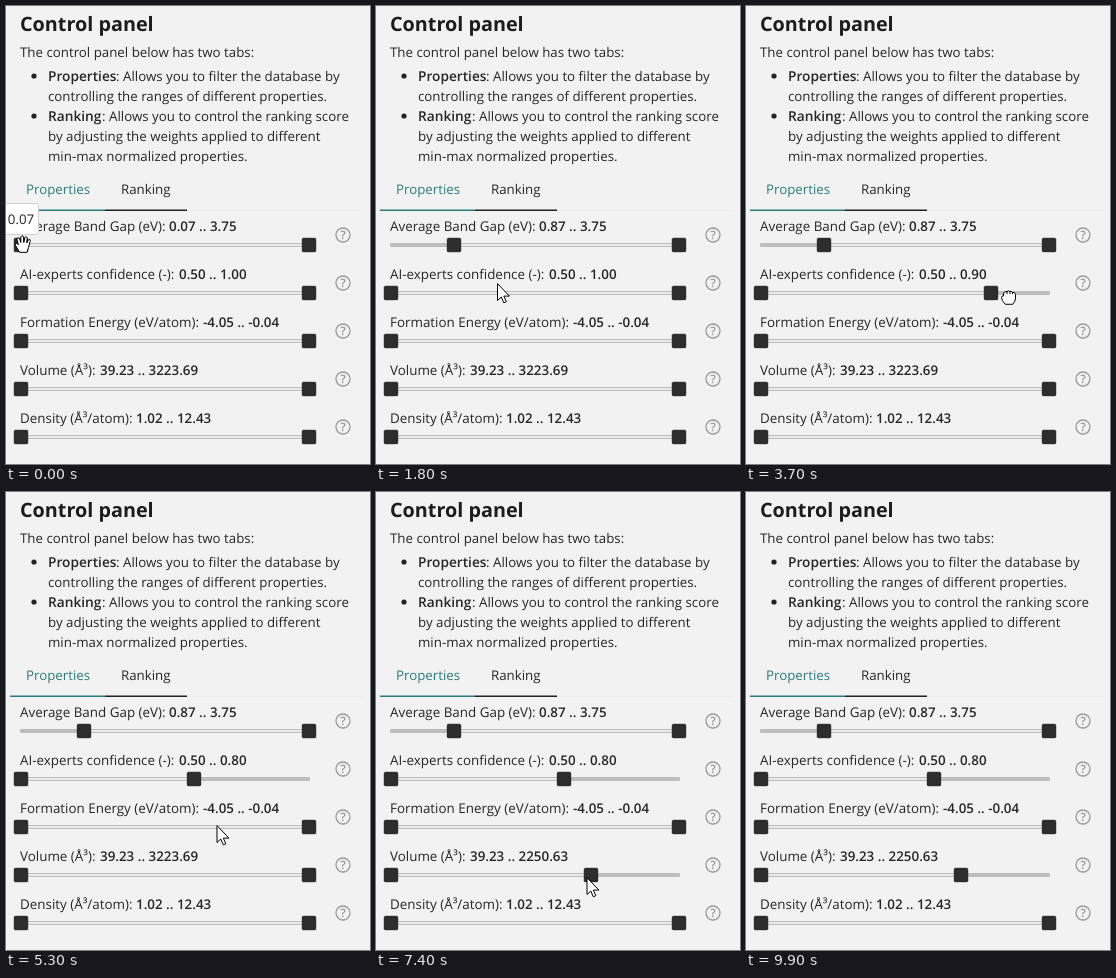
Recreate the animation shown at these times as an HTML page. Size 364x458 px, loop 10 s.

```html
<!DOCTYPE html>
<html lang="en">
<head>
<meta charset="utf-8">
<title>Control panel</title>
<style>
  html, body { margin: 0; width: 100%; height: 100%; overflow: hidden; background: #f2f2f2; }
  svg { display: block; width: 364px; height: 458px; }
  text { font: 13.3px "Open Sans", "Noto Sans", sans-serif; fill: #262626; white-space: pre; text-rendering: geometricPrecision; }
  .title { font-size: 19.8px; font-weight: 700; fill: #1c1c1c; }
  .bold { font-size: 13.4px; font-weight: 600; }
  .term { font-size: 13.7px; font-weight: 600; }
  .label { font-size: 13.4px; }
  .tab-on { fill: #2b7c7c; }
  .track { fill: #bebebe; }
  .range { fill: #e9e9e9; stroke: #bcbcbc; }
  .handle { fill: #2d2d2d; stroke: #2d2d2d; stroke-opacity: .4; }
  .help { fill: none; stroke: #9a9a9a; stroke-width: 1.3; }
  .mark { font-size: 11.5px; font-weight: 600; fill: #959595; text-anchor: middle; }
  .tip rect { fill: #fff; stroke: #cfcfcf; }
  .tip text { text-anchor: middle; }
  .cursor { fill: #fff; stroke: #000; stroke-linejoin: round; stroke-linecap: round; }
</style>
</head>
<body>
<svg id="stage" viewBox="0 0 364 458">
  <rect width="364" height="458" fill="#f2f2f2"/>
  <text class="title" x="14" y="25">Control panel</text>
  <text x="14" y="51">The control panel below has two tabs:</text>
  <circle cx="28" cy="70" r="2.6" fill="#222"/>
  <text class="term" x="42" y="75">Properties</text>
  <text x="110" y="75">: Allows you to filter the database by</text>
  <text x="42" y="95">controlling the ranges of different properties.</text>
  <circle cx="28" cy="110" r="2.6" fill="#222"/>
  <text class="term" x="42" y="115">Ranking</text>
  <text x="96" y="115">: Allows you to control the ranking score</text>
  <text x="42" y="135">by adjusting the weights applied to different</text>
  <text x="42" y="155">min-max normalized properties.</text>
  <text class="tab-on" x="20" y="188">Properties</text>
  <text x="115" y="188">Ranking</text>
  <rect x="5" y="204" width="352" height="1" fill="#ebebeb"/>
  <rect x="4" y="203.5" width="95" height="1.5" fill="#2b7c7c"/>
  <rect x="99" y="203.5" width="82" height="1.5" fill="#222"/>
</svg>
<script>
const NS = "http://www.w3.org/2000/svg";
const stage = document.getElementById("stage");
const LOOP = 10000, STEP = 100;
const LEFT = 15, SPAN = 288;

function add(parent, tag, attrs = {}, markup = "") {
  const el = document.createElementNS(NS, tag);
  set(el, attrs);
  el.innerHTML = markup;
  return parent.appendChild(el);
}

function set(el, attrs) {
  for (const key in attrs) el.setAttribute(key, attrs[key]);
}

const raise = s => s.replace("³", '<tspan dy="-2">³</tspan><tspan dy="2">') + (s.includes("³") ? "</tspan>" : "");

function makeSlider([label, valueX, min, max], i) {
  const y = 239 + 48 * i;
  add(stage, "text", { class: "label", x: 14, y: y - 14 }, raise(label));
  const value = add(stage, "text", { class: "bold", x: valueX, y: y - 14 });
  add(stage, "rect", { class: "track", x: 14, y: y - 2, width: 290, height: 4, rx: 1 });
  const range = add(stage, "rect", { class: "range", y: y - 1.5, height: 3 });
  const handles = [0, 1].map(() =>
    add(stage, "rect", { class: "handle", y: y - 7, width: 14, height: 14, rx: 1.5 }));
  add(stage, "circle", { class: "help", cx: 337, cy: y - 10, r: 7 });
  add(stage, "text", { class: "mark", x: 337, y: y - 5.8 }, "?");

  const place = v => LEFT + SPAN * (v - min) / (max - min);
  const update = (lo = min, hi = max) => {
    const a = place(lo), b = place(hi);
    value.textContent = lo.toFixed(2) + " .. " + hi.toFixed(2);
    set(range, { x: a, width: b - a });
    set(handles[0], { x: Math.round(a) - 7 });
    set(handles[1], { x: Math.round(b) - 7 });
  };
  update();
  return { y, place, update };
}

const [gap, trust, , volume] = [
  ["Average Band Gap (eV):", 163, 0.07, 3.75],
  ["AI-experts confidence (-):", 173, 0.5, 1],
  ["Formation Energy (eV/atom):", 197, -4.05, -0.04],
  ["Volume (Å³):", 94, 39.23, 3223.69],
  ["Density (Å³/atom):", 130, 1.02, 12.43]
].map(makeSlider);

const tip = add(stage, "g", { class: "tip" });
const tipBox = add(tip, "rect", { height: 31, rx: 2.5 });
const tipText = add(tip, "text");

const shapes = {
  arrow: "M0 0V16.5L3.8 13L6.3 18.8L8.8 17.7L6.3 12.1H11.5Z",
  open: "M-3.5 8L-7.5 1.5Q-8.5-.5-7-1Q-5.8-1-4.6.8L-6-4.5Q-6-6.2-4.8-6.2Q-3.7-6.2-3.2-4.5" +
    "L-2.2-1.5V-7Q-1.8-8.2-.8-8.2Q.3-8.2.5-7L.8-1.5L1.8-6.3Q2.2-7.4 3.2-7.2Q4.2-6.9 4.1-5.6" +
    "L3.8-1L5.2-4Q6-5 6.8-4.6Q7.6-4 7.2-2.8L5.5 3.5L4 8Z",
  fist: "M-3.5 7Q-7 3.5-7 .5Q-7-1.5-5-1V-3Q-5-5-3.5-5Q-2.3-5.8-1.5-5.4Q0-7 1.5-5.4Q3-6.2 4-4.6" +
    "Q7-5 7-2.5V1Q7 4.5 4.5 7ZM-1.5-5V-3.2M1.5-5V-3.2M4-4.5V-3.2"
};
const cursor = add(stage, "path", { class: "cursor" });

// time, x, y, shape until the next point
const path = [
  [0, 17, 238, "open"], [200, 17, 238, "fist"], [1100, 79, 239, "open"], [1300, 80, 241, "arrow"],
  [1800, 121.5, 278, "arrow"], [2700, 299, 285, "open"], [3100, 304, 288, "fist"],
  [3700, 262.5, 291, "fist"], [4400, 190, 290, "open"], [4700, 191, 291, "arrow"],
  [5300, 211, 334, "arrow"], [5800, 299, 383, "open"], [6000, 300, 384, "fist"],
  [6400, 247, 384, "fist"], [7100, 211, 384, "open"], [7400, 211, 386, "arrow"],
  [7800, 226, 460, "arrow"], [LOOP, 226, 460, "arrow"]
];
const gapKeys = [[200, 0.07], [1100, 0.87]];
const volumeKeys = [[6000, 3223.69], [6400, 2726.13], [7100, 2250.63]];

function sample(keys, t, col = 1) {
  if (t <= keys[0][0]) return keys[0][col];
  for (let i = 1; i < keys.length; i++) {
    const a = keys[i - 1], b = keys[i];
    if (t < b[0]) return a[col] + (b[col] - a[col]) * (t - a[0]) / (b[0] - a[0]);
  }
  return keys[keys.length - 1][col];
}

function showTip(slider, value) {
  const x = Math.round(slider.place(value)), label = value.toFixed(2);
  const width = label.length > 4 ? 60 : 36;
  set(tipBox, { x: x - width / 2 + 0.5, y: slider.y - 41.5, width: width - 1 });
  set(tipText, { x, y: slider.y - 21 });
  tipText.textContent = label;
}

function draw(t) {
  const x = sample(path, t, 1), y = sample(path, t, 2);
  const shape = path.filter(p => p[0] <= t).pop()[3];

  const gapLow = 0.07 + Math.round((sample(gapKeys, t) - 0.07) * 10) / 10;
  const dragX = Math.min(303, Math.max(188, x));
  const snapped = Math.round((0.5 + 0.5 * (dragX - LEFT) / SPAN) * 10) / 10;
  const trustHigh = t < 3100 ? 1 : t < 4400 ? snapped : 0.8;
  const volumeHigh = sample(volumeKeys, t);
  gap.update(gapLow);
  trust.update(undefined, trustHigh);
  volume.update(undefined, volumeHigh);

  const onTrust = Math.abs(x - trust.place(trustHigh)) < 9;
  const hover = shape !== "arrow" && (t < 2000 || t > 5000 || onTrust);
  tip.style.display = hover ? "" : "none";
  if (hover) {
    if (t < 2000) showTip(gap, gapLow);
    else if (t < 5000) showTip(trust, trustHigh);
    else showTip(volume, volumeHigh);
  }
  set(cursor, { d: shapes[shape], transform: `translate(${x} ${y})` });
}

function frame() {
  draw(Math.floor(performance.now() % LOOP / STEP) * STEP);
  requestAnimationFrame(frame);
}
frame();
</script>
</body>
</html>
```
